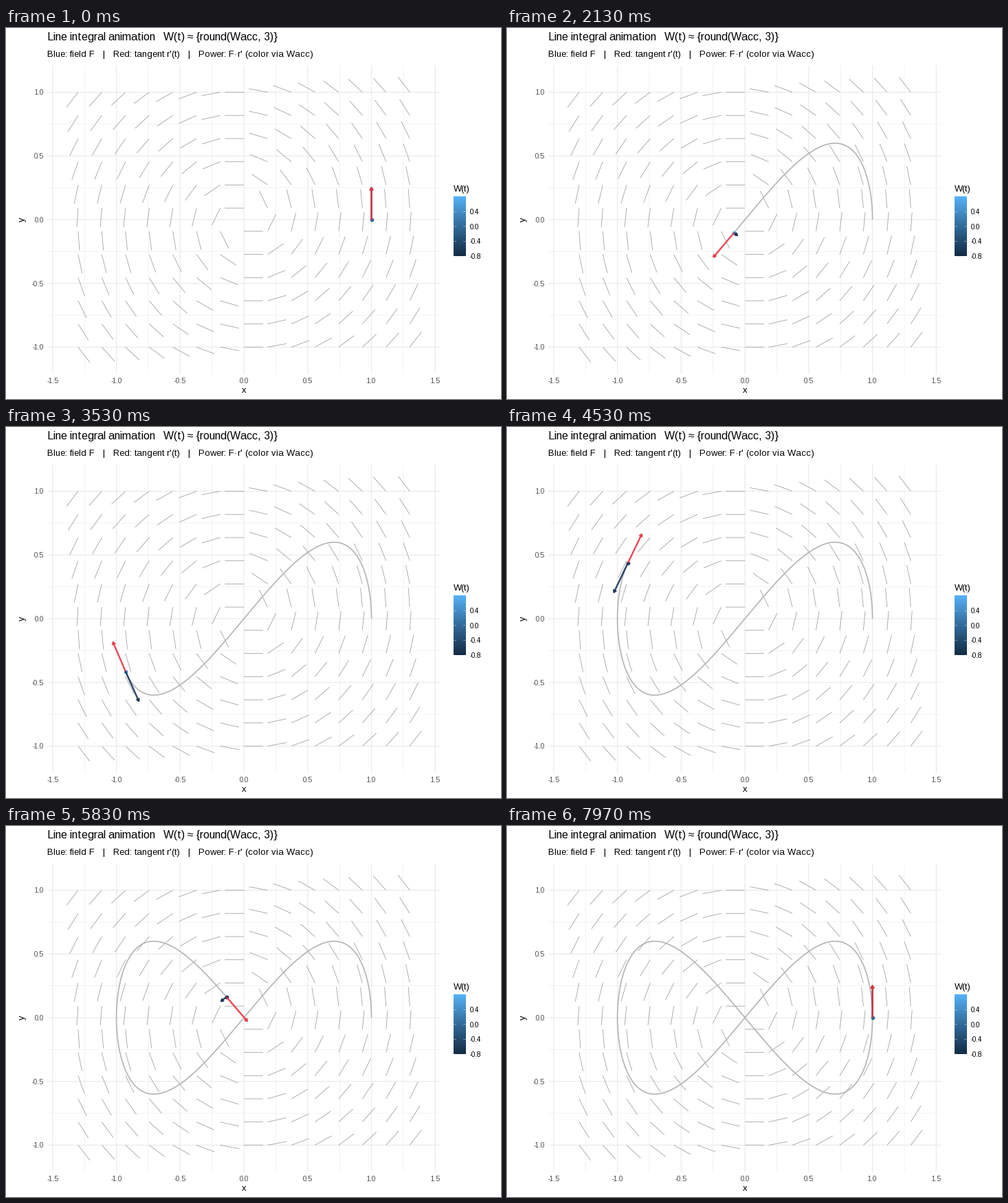
A matplotlib script that plays this animation: 720x540 px, repeating every 8 s.

```python
import numpy as np
import matplotlib.pyplot as plt
from matplotlib.animation import FuncAnimation
from matplotlib.collections import LineCollection
from matplotlib.colors import LinearSegmentedColormap

plt.rcParams.update({
    "font.family": "Liberation Sans",
    "text.hinting_factor": 1,
    "path.snap": False,
    "toolbar": "None",
})

W, H = 720, 540
FRAMES, LOOP = 240, 8000
SCALE, CX, CY = 185.5, 346.1, 279.0
LEFT, RIGHT = CX - 1.54 * SCALE, CX + 1.54 * SCALE
TOP, BOTTOM = CY - 1.21 * SCALE, CY + 1.21 * SCALE
RED, NAVY = "#E63946", "#1D3557"
BLUES = LinearSegmentedColormap.from_list("blues", ["#132B43", "#326B99", "#56B1F7"])


def px(x, y):
    """Data coordinates to stage pixels."""
    return np.stack([CX + SCALE * np.asarray(x), CY - SCALE * np.asarray(y)], axis=-1)


def curve(t):
    return np.cos(t), 0.6 * np.sin(2 * t)


def work(t):
    return 0.9 * np.sin(t) + 0.1 * np.sin(3 * t)


fig = plt.figure(figsize=(W / 72, H / 72), dpi=72, facecolor="white")
ax = fig.add_axes([0, 0, 1, 1])
ax.set_xlim(0, W)
ax.set_ylim(H, 0)
ax.axis("off")


def segments(lines, color, width, z):
    ax.add_collection(LineCollection(lines, colors=color, linewidths=width,
                                     capstyle="butt", zorder=z))


def label(x, y, text, size, color="black", ha="left", **kw):
    ax.text(x, y, text, size=size, color=color, ha=ha, va="baseline", **kw)


# Grid and tick labels
def grid_lines(xs, ys):
    cols = [[(CX + SCALE * v, TOP), (CX + SCALE * v, BOTTOM)] for v in xs]
    rows = [[(LEFT, CY - SCALE * v), (RIGHT, CY - SCALE * v)] for v in ys]
    return cols + rows


x_major, y_major = np.arange(-3, 4) / 2, np.arange(-2, 3) / 2
segments(grid_lines(np.arange(-5, 6, 2) / 4, np.arange(-3, 4, 2) / 4), "#EBEBEB", 0.63, 1)
segments(grid_lines(x_major, y_major), "#EBEBEB", 1.26, 1.1)
for v in x_major:
    label(CX + SCALE * v, 517, f"{v:.1f}", 10.4, "#4D4D4D", "center")
for v in y_major:
    label(54.8, CY - SCALE * v + 3.8, f"{v:.1f}", 10.4, "#4D4D4D", "right")

# Titles
label(LEFT, 18, "Line integral animation   W(t) ≈ {round(Wacc, 3)}", 15.6)
label(LEFT, 42, "Blue: field F   |   Red: tangent r'(t)   |   Power: F·r' (color via Wacc)", 13)
label(CX, 531, "x", 13, ha="center")
label(27, CY, "y", 13, ha="center", rotation=90, rotation_mode="anchor")

# Color bar
BAR_L, BAR_R, BAR_T, BAR_B = 651.3, 668.6, 245.7, 332.1
label(BAR_L, 238, "W(t)", 13)
ax.imshow(np.linspace(1, 0, 256)[:, None], cmap=BLUES, aspect="auto",
          extent=(BAR_L, BAR_R, BAR_B, BAR_T), interpolation="bilinear", zorder=2)
for v in (0.4, 0.0, -0.4, -0.8):
    y = BAR_B - (v + 0.8) / 1.6 * (BAR_B - BAR_T)
    segments([[(BAR_L, y), (BAR_L + 3.5, y)], [(BAR_R - 3.5, y), (BAR_R, y)]], "white", 0.4, 3)
    label(675, y + 3.7, f"{v:.1f}", 10.4)

# Rotational field, unit directions
gx, gy = np.meshgrid(np.linspace(-1.3, 1.3, 15), np.linspace(-1, 1, 12))
gx, gy = gx.ravel(), gy.ravel()
norm = np.hypot(gx, gy)
ends = px(gx - 0.15 * gy / norm, gy + 0.15 * gx / norm)
segments(np.stack([px(gx, gy), ends], axis=1), "#9E9E9E", 0.8, 4)


class Arrow:
    def __init__(self, color, z):
        style = dict(color=color, alpha=0.9, zorder=z)
        self.shaft, = ax.plot([], [], lw=2.45, solid_capstyle="butt", **style)
        self.head = plt.Polygon(np.zeros((3, 2)), lw=2.45, joinstyle="round", **style)
        ax.add_patch(self.head)

    def place(self, start, vec, length=3.4):
        tip = start + SCALE * np.array([vec[0], -vec[1]])
        self.shaft.set_data([start[0], tip[0]], [start[1], tip[1]])
        back = np.arctan2(start[1] - tip[1], start[0] - tip[0])
        a, b = (tip + length * np.array([np.cos(back + s), np.sin(back + s)])
                for s in (-np.pi / 6, np.pi / 6))
        self.head.set_xy([a, tip, b])


trail, = ax.plot([], [], color="#B5B5B5", lw=1.7, solid_capstyle="butt",
                 solid_joinstyle="round", zorder=5)
dot, = ax.plot([], [], "o", ms=5.68, mew=0, zorder=6)
field, tangent = Arrow(NAVY, 7), Arrow(RED, 8)
times = np.linspace(0, 2 * np.pi, FRAMES)
route = px(*curve(times))


def update(i):
    t = times[i]
    x, y = curve(t)
    vel = np.array([-np.sin(t), 1.2 * np.cos(2 * t)])
    trail.set_data(route[:i + 1, 0], route[:i + 1, 1])
    dot.set_data(route[i:i + 1, 0], route[i:i + 1, 1])
    dot.set_color(BLUES((work(t) + 0.8) / 1.6))
    field.place(route[i], (-0.25 * y, 0.25 * x))
    tangent.place(route[i], 0.25 * vel / np.hypot(*vel))
    return trail, dot, field.shaft, field.head, tangent.shaft, tangent.head


anim = FuncAnimation(fig, update, frames=FRAMES, interval=LOOP / FRAMES,
                     repeat=True, repeat_delay=0, blit=False)
plt.show()
```
